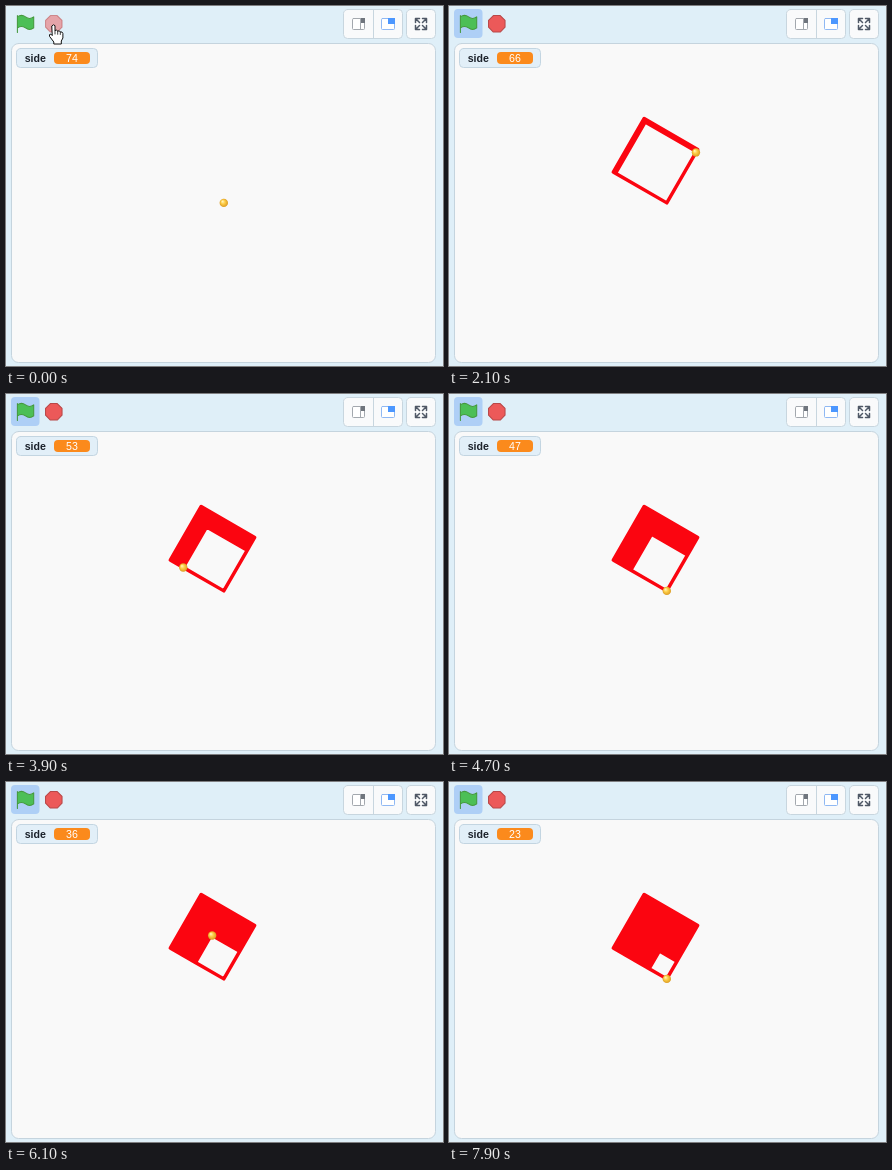
Animation of 437x360 px, one loop 8000 ms. Source, as an HTML page with a canvas:

```html
<!DOCTYPE html>
<html lang="en">
<head>
<meta charset="utf-8">
<title>Shrinking square</title>
<style>
  html, body { margin: 0; width: 437px; height: 360px; overflow: hidden; background: #dfeff8; }
  canvas { display: block; }
</style>
</head>
<body>
<canvas id="stage" width="437" height="360"></canvas>
<script>
const LOOP = 8000, STEP = 100, START = 1650;
const CENTER = [217.8, 196.9], UNIT = 0.8833, FIRST_SIDE = 70;
const ctx = document.getElementById('stage').getContext('2d');

const FLAG = new Path2D('M.75 2A6.44 6.44 0 0 1 8.44 2 6.44 6.44 0 0 0 16.13 2V12.4A6.44 6.44 0 0 1 8.44 12.4 6.44 6.44 0 0 0 .75 12.4M.75 16.75V.75');
const STOP = new Path2D('M4.3.5H9.7L13.5 4.3V9.7L9.7 13.5H4.3L.5 9.7V4.3Z');
const ARROW = new Path2D('M0 0V14.5L3.3 11.4 5.7 17 8 16 5.6 10.5H10Z');
const HAND = new Path2D('M-1.5 1.2Q0-.8 1.5 1.2V6Q3.2 5 4.2 6.6 5.8 5.8 6.8 7.4 8.8 6.8 9.4 9V13.5L7.8 16.5V19.5H.3V17.5L-4 11.8Q-4.6 9.4-2.6 9.6L-1.5 10.8Z');
const HAND_FOLDS = new Path2D('M1.5 6V9.5M4.2 6.6V9.8M6.8 7.4V10');
const EXPAND = new Path2D('M409.5 16.5V12.5H413.5M409.5 12.5L413.5 16.5M416.5 12.5H420.5V16.5M420.5 12.5L416.5 16.5M409.5 19.5V23.5H413.5M409.5 23.5L413.5 19.5M420.5 19.5V23.5H416.5M420.5 23.5L416.5 19.5');

function box(x, y, w, h, radius, fill, stroke) {
  ctx.beginPath();
  ctx.roundRect(x, y, w, h, radius);
  if (fill) { ctx.fillStyle = fill; ctx.fill(); }
  if (stroke) { ctx.strokeStyle = stroke; ctx.lineWidth = 1; ctx.stroke(); }
}

function shape(path, x, y, scale, fill, stroke, width = 1) {
  ctx.save();
  ctx.translate(x, y);
  ctx.scale(scale, scale);
  ctx.fillStyle = fill;
  ctx.strokeStyle = stroke;
  ctx.lineWidth = width;
  ctx.lineJoin = ctx.lineCap = 'round';
  ctx.fill(path);
  ctx.stroke(path);
  ctx.restore();
}

function text(str, x, y, color, weight = '', align = 'left') {
  ctx.font = `${weight} 10.6px "Liberation Sans", Arial, sans-serif`;
  ctx.textAlign = align;
  ctx.fillStyle = color;
  ctx.fillText(str, x, y);
}

const sideAt = move => FIRST_SIDE - Math.floor((move - 1) / 4);

// Moves made so far: right, top, left and back to the start for each square.
const movesAt = t => t < START ? 0 : Math.floor((t - 2100) / 33.2 + 17.7);

function corner(move) {
  if (!move) return CENTER;
  const a = sideAt(move) * UNIT, k = move % 4;
  const u = k === 1 || k === 2 ? a : 0, v = k === 2 || k === 3 ? a : 0;
  return [CENTER[0] + u * 0.5 - v * 0.866, CENTER[1] - u * 0.866 - v * 0.5];
}

function drawTrail(moves) {
  ctx.beginPath();
  ctx.moveTo(...CENTER);
  for (let i = 1; i <= moves; i++) ctx.lineTo(...corner(i));
  ctx.strokeStyle = '#fb0510';
  ctx.lineWidth = 3.4;
  ctx.lineJoin = ctx.lineCap = 'round';
  ctx.stroke();
}

function drawBall([x, y]) {
  const shade = ctx.createRadialGradient(x - 1.4, y - 1.6, 0.3, x, y, 4.4);
  shade.addColorStop(0, '#fff3b8');
  shade.addColorStop(0.4, '#ffd04a');
  shade.addColorStop(1, '#d9981f');
  ctx.beginPath();
  ctx.arc(x, y, 4.2, 0, 7);
  ctx.fillStyle = shade;
  ctx.fill();
}

function drawToolbar(running) {
  const line = '#c8d6df', face = '#f9fafb';
  if (running) box(5, 3, 28.5, 29, 4, '#aecff6');
  shape(FLAG, 10.6, 8.8, 1.06, '#4cbf56', '#45993d', 1);
  ctx.globalAlpha = running ? 1 : 0.5;
  shape(STOP, 38.9, 8.9, 1.27, '#ec5959', '#b84848', 0.8);
  ctx.globalAlpha = 1;

  box(337.5, 3.5, 59, 29, 4, face, line);
  box(400.5, 3.5, 29, 29, 4, face, line);
  ctx.fillStyle = line;
  ctx.fillRect(367, 4, 1, 28);

  box(346.5, 12.5, 12, 11, 1, '#fff', '#a3a8ae');
  ctx.fillStyle = '#a3a8ae';
  ctx.fillRect(354, 13, 1, 10);
  ctx.fillStyle = '#6f757d';
  ctx.fillRect(355, 12, 4, 5);

  box(375.5, 12.5, 13, 11, 1, '#fff', '#8fb8f3');
  ctx.fillStyle = '#4c97ff';
  ctx.fillRect(382, 12, 7, 6);

  ctx.strokeStyle = '#4f5866';
  ctx.lineWidth = 1.5;
  ctx.stroke(EXPAND);
}

function drawMonitor(value) {
  box(10.5, 42.5, 81, 19, 4, '#e2eff8', '#c3d5e1');
  text('side', 18.7, 56, '#1c222b', 'bold');
  box(48, 46, 36, 12, 4, '#fb8a1c');
  text(value, 66, 55.9, '#fff', '', 'center');
}

function pointerAt(t) {
  if (t < 900) {
    const u = t / 900, swing = Math.sin(Math.PI * u) ** 2;
    return [47.5 - 25.5 * u + 368 * swing, 18.5 - 8.5 * u + 90 * swing];
  }
  if (t <= 1700) return [22, 10];
  if (t < 2050) {
    const u = (t - 1700) / 350;
    return [22 + 304 * u, 10 - 30 * u];
  }
  const u = (t - 6300) / 700;
  return u > 0 && u < 1 ? [-16 + 31 * Math.sin(Math.PI * u), 167 + 40 * u] : null;
}

function drawPointer(t) {
  const at = pointerAt(t);
  if (!at) return;
  const [x, y] = at;
  if (x < 60 && y < 33) {
    shape(HAND, x, y, 1, '#fff', '#111', 1);
    ctx.save();
    ctx.translate(x, y);
    ctx.lineWidth = 0.8;
    ctx.strokeStyle = '#111';
    ctx.stroke(HAND_FOLDS);
    ctx.restore();
  } else {
    shape(ARROW, x, y, 1, '#fff', '#222', 1);
  }
}

function drawTooltip(t) {
  const alpha = Math.min((t - 900) / 300, (1500 - t) / 200, 1);
  if (alpha <= 0) return;
  ctx.globalAlpha = alpha;
  box(25.5, 24.5, 39, 24, 2, '#fff', '#c8c8c8');
  text('Go', 45, 40.5, '#555', '', 'center');
  ctx.globalAlpha = 1;
}

function draw(t) {
  const moves = movesAt(t);
  ctx.fillStyle = '#dfeff8';
  ctx.fillRect(0, 0, 437, 360);
  drawToolbar(t >= START);
  box(5.5, 37.5, 424, 319, 7, '#f9f9f9', '#c5d4de');
  drawTrail(moves);
  drawBall(corner(moves));
  drawMonitor(moves ? sideAt(moves) : 74);
  drawTooltip(t);
  drawPointer(t);
}

function tick() {
  const t = performance.now() % LOOP;
  draw(Math.floor(t / STEP) * STEP);
  requestAnimationFrame(tick);
}
tick();
</script>
</body>
</html>
```
